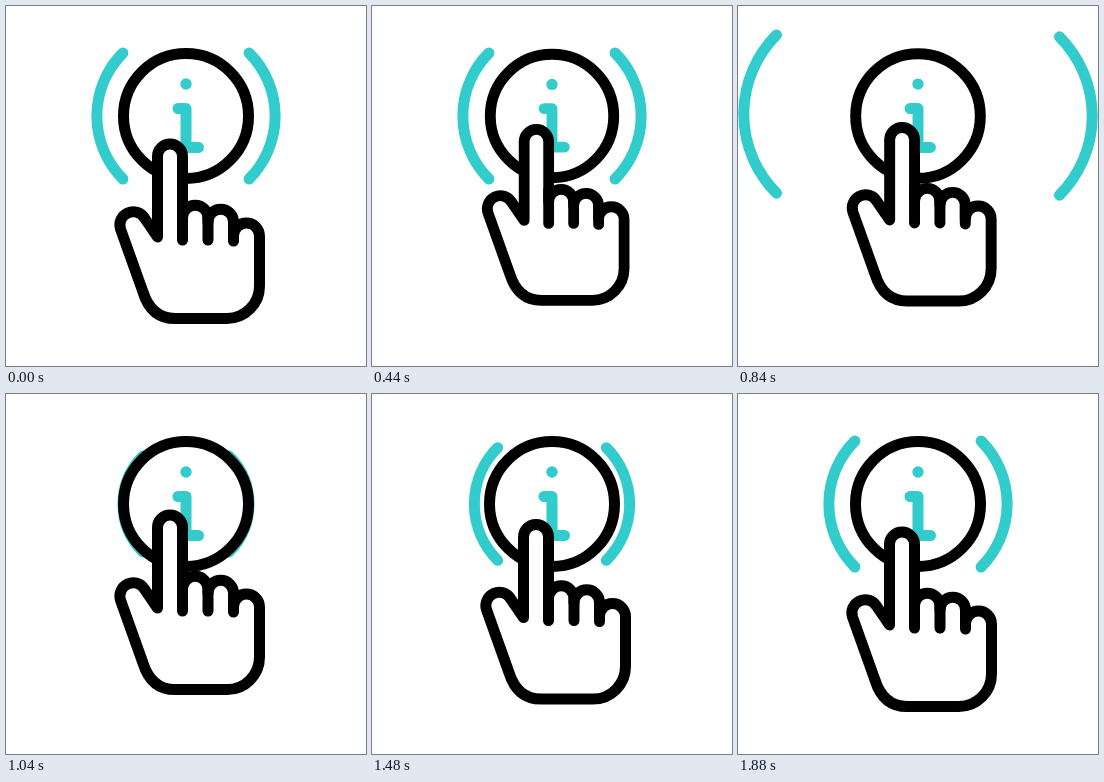
Animation, 360 px wide and 360 px high, one loop 2000 ms. Source, as an HTML page:

```html
<!DOCTYPE html>
<html lang="en">
<head>
<meta charset="utf-8">
<title>Tap for info</title>
<style>
  html, body { margin: 0; width: 100%; height: 100%; overflow: hidden; background: #fff; }
  svg { display: block; width: 100vw; height: 100vh; }
  path, circle { stroke-width: 11; stroke-linecap: round; stroke-linejoin: round; }
  .teal { stroke: #33cccc; fill: none; }
  .ink { stroke: #000; fill: #fff; }
  .line { fill: none; }
</style>
</head>
<body>
<svg viewBox="0 0 360 360">
  <path id="left" class="teal"/>
  <path id="right" class="teal"/>
  <g id="badge">
    <circle class="ink" cx="180" cy="110" r="62.5"/>
    <circle cx="180" cy="78" r="5.7" fill="#33cccc"/>
    <path class="teal" d="M172 102.5H180V141.5M168 141.5H192.5"/>
  </g>
  <g id="hand">
    <path class="ink" d="M151.5 231L138.5 212A13.3 13.3 0 0 0 114.5 223L137 286
      C142 302 152 312.5 169 312.5H221A32.5 32.5 0 0 0 253.5 280V230
      A13 13 0 0 0 227.5 230V216A12.75 12.75 0 0 0 202 216V212
      A12.75 12.75 0 0 0 176.5 212V150.5A12.5 12.5 0 0 0 151.5 150.5Z"/>
    <path class="ink line" d="M176.5 200V234M202 212V234M227.5 216V235"/>
  </g>
</svg>
<script>
  const LOOP = 2000, STEP = 40;
  const [left, right, badge, hand] =
    ['left', 'right', 'badge', 'hand'].map(id => document.getElementById(id));

  // Sine ease-in-out from 0 to 1 between two times
  const ease = (t, from, to) => {
    const p = Math.min(1, Math.max(0, (t - from) / (to - from)));
    return (1 - Math.cos(Math.PI * p)) / 2;
  };

  // A quarter circle bulging towards `side`, centred `dist` from the badge
  function arc(side, dist, scale, dy) {
    const x = 180 + side * (dist - 13.2 * scale);
    const y = 110 + dy, half = 63 * scale, r = 89.2 * scale;
    return `M${x} ${y - half}A${r} ${r} 0 0 ${side > 0 ? 1 : 0} ${x} ${y + half}`;
  }

  const scaleAt = (s, x, y) => `translate(${x} ${y}) scale(${s}) translate(${-x} ${-y})`;

  function draw(t) {
    const back = ease(t, 1000, 1890);
    const lift = ease(t, 0, 500) - back;
    const press = ease(t, 0, 500) - ease(t, 500, 1000);

    hand.setAttribute('transform',
      `translate(0 ${-17 * lift}) ${scaleAt(1 - 0.021 * press, 184, 225)}`);
    badge.setAttribute('transform', scaleAt(1 - 0.013 * press, 180, 110));

    let shift, scale, dy = 0;
    if (t < 1000) {
      shift = 138 * ease(t, 510, 1100);
      scale = 1 + Math.min(0.32, shift * 0.00313);
      dy = -0.024 * shift;
    } else {
      shift = -23.2 * (1 - back);
      scale = 1 - 0.24 * (1 - back);
    }
    left.setAttribute('d', arc(-1, 76.3 + shift, scale, dy));
    right.setAttribute('d', arc(1, 76.3 + shift, scale, 0));
  }

  const start = performance.now();
  function tick() {
    const t = (performance.now() - start) % LOOP;
    draw(Math.floor(t / STEP) * STEP);
    requestAnimationFrame(tick);
  }
  tick();
</script>
</body>
</html>
```
